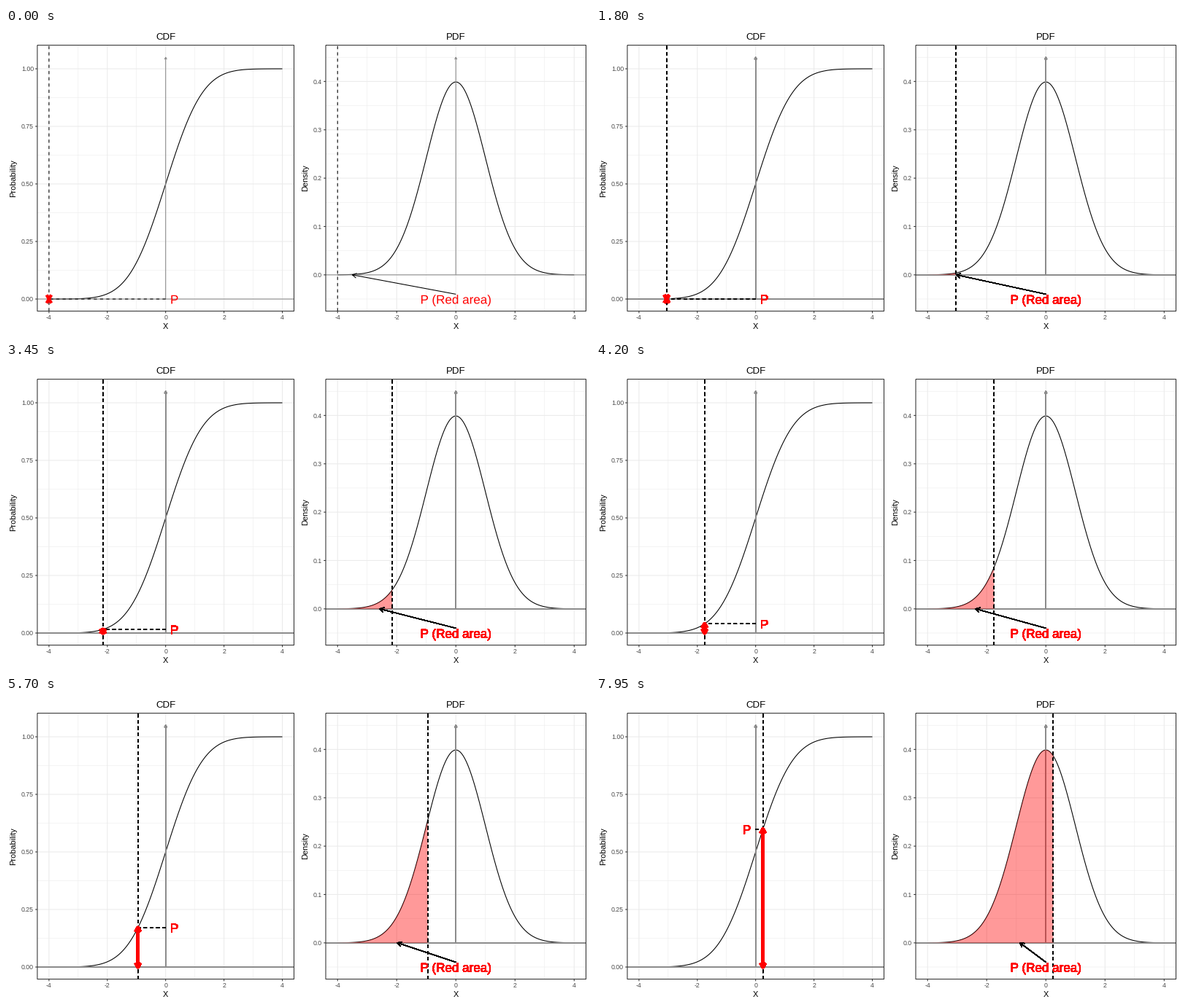
These frames come from a looping animation (800 px wide and 420 px high, 8 s). A matplotlib script:

```python
import math

import matplotlib.pyplot as plt
import numpy as np
from matplotlib.animation import FuncAnimation
from matplotlib.patheffects import Normal

plt.rcParams["font.family"] = "Liberation Sans"
plt.rcParams["path.simplify"] = False

W, H, DPI = 800, 420, 100
PT = 72 / DPI            # points per pixel
THIN = 1.07
CM = 28.35               # pixels per centimetre
TOP, BOTTOM = 23.6, 388.6
GREY = "#8c8c8c"
STEP_MS, TICK_MS, LOOP_MS = 150, 50, 8000
MAX_COPIES = 40          # edges are saturated beyond this

fig = plt.figure(figsize=(W / DPI, H / DPI), dpi=DPI, facecolor="white")
ax = fig.add_axes([0, 0, 1, 1])
ax.set(xlim=(0, W), ylim=(H, 0))
ax.axis("off")


def pdf(x):
    return np.exp(-np.square(x) / 2) / math.sqrt(2 * math.pi)


def cdf(x):
    return 0.5 * (1 + math.erf(x / math.sqrt(2)))


def stroke(xs, ys, color, width=THIN, z=1, **kw):
    line, = ax.plot(xs, ys, color=color, lw=width * PT, zorder=z,
                    solid_capstyle="butt", dash_capstyle="butt",
                    solid_joinstyle="round", **kw)
    line.set_snap(False)
    return line


def label(x, y, text, size, color="black", ha="center", z=7, **kw):
    return ax.text(x, y, text, fontsize=size * PT, color=color, ha=ha,
                   va="baseline", zorder=z, **kw)


def arrow_points(start, end, length, both=False):
    """Polyline of a shaft with open 30 degree heads."""
    (x0, y0), (x1, y1) = start, end
    heading = math.atan2(y1 - y0, x1 - x0)
    xs, ys = [x0, x1], [y0, y1]
    heads = [(x1, y1, heading)]
    if both:
        heads.append((x0, y0, heading + math.pi))
    side = length / math.cos(math.pi / 6)
    for x, y, a in heads:
        left, right = a + math.pi * 5 / 6, a - math.pi * 5 / 6
        xs += [math.nan, x + side * math.cos(left), x, x + side * math.cos(right)]
        ys += [math.nan, y + side * math.sin(left), y, y + side * math.sin(right)]
    return xs, ys


class Panel:
    def __init__(self, left, right, low, high, title, ylabel, title_x):
        self.left, self.right, self.low = left, right, low
        self.ux = (right - left) / 8.8
        self.uy = (BOTTOM - TOP) / (high - low)
        mid = (left + right) / 2
        label(mid, 16.3, title, 13.2)
        label(mid, 412.6, "X", 11)
        label(title_x, (TOP + BOTTOM) / 2, ylabel, 11, rotation=90,
              rotation_mode="anchor")
        stroke([left, right, right, left, left],
               [TOP, TOP, BOTTOM, BOTTOM, TOP], "#333333", z=8)

    def x(self, v):
        return (self.left + self.right) / 2 + self.ux * v

    def y(self, v):
        return BOTTOM - self.uy * (v - self.low)

    def grid(self, major, minor, fmt):
        for v in (-3, -1, 1, 3):
            stroke([self.x(v)] * 2, [TOP, BOTTOM], "#ebebeb", THIN / 2)
        for v in minor:
            stroke([self.left, self.right], [self.y(v)] * 2, "#ebebeb", THIN / 2)
        for v in (-4, -2, 0, 2, 4):
            x = self.x(v)
            stroke([x, x], [TOP, BOTTOM], "#ebebeb", z=1.5)
            stroke([x, x], [BOTTOM, BOTTOM + 2.75], "#333333")
            label(x, 400.5, str(v), 8.8, "#4d4d4d")
        for v in major:
            y = self.y(v)
            stroke([self.left, self.right], [y, y], "#ebebeb", z=1.5)
            stroke([self.left - 2.75, self.left], [y, y], "#333333")
            label(self.left - 4.95, y + 3.2, fmt % v, 8.8, "#4d4d4d", "right")

    def axes(self, top):
        tip = arrow_points((self.x(0), self.y(0)), (self.x(0), self.y(top)), 0.1 * CM)
        return [stroke([self.left, self.right], [self.y(0)] * 2, GREY, z=3),
                stroke(*tip, GREY, z=3)]


def dashed():
    return stroke([0, 0], [BOTTOM, TOP], "black", z=5, ls=(0, (4, 4)))


xs = np.linspace(-4, 4, 161)
cum = Panel(42.9, 394.5, -0.0525, 1.1025, "CDF", "Probability", 13.3)
den = Panel(438.0, 794.5, -0.075, 0.475, "PDF", "Density", 413.3)
cum.grid(np.arange(5) / 4, np.arange(1, 8, 2) / 8, "%.2f")
den.grid(np.arange(5) / 10, np.arange(-1, 10, 2) / 20, "%.1f")

stroke(cum.x(xs), [cum.y(cdf(v)) for v in xs], "black", z=2)
stroke(den.x(xs), den.y(pdf(xs)), "black", z=2)
area, = ax.fill([0, 0, 0], [0, 0, 0], color="red", alpha=0.4, lw=0, zorder=4)

cum_rule, den_rule, level = dashed(), dashed(), dashed()
height = stroke([], [], "red", 4 * THIN, z=6)
pointer = stroke([], [], "black", z=6)
p_text = label(0, 0, "P", 17.07, "red")
area_text = label(den.x(0), den.y(-0.05) + 6.5, "P (Red area)", 17.07, "red")
stacked = cum.axes(1.05) + den.axes(0.45) + [
    cum_rule, den_rule, level, height, pointer, p_text, area_text]


def update(i):
    k = i * TICK_MS // STEP_MS
    state = max(0, math.ceil((k - 0.5) * 160 / 99))
    s = -4 + 0.05 * state
    p = cdf(s)
    positive = state > 80

    cum_rule.set_xdata([cum.x(s)] * 2)
    den_rule.set_xdata([den.x(s)] * 2)
    level.set_data([cum.x(0), cum.x(s)], [cum.y(p)] * 2)
    height.set_data(*arrow_points((cum.x(s), cum.y(0)), (cum.x(s), cum.y(p)),
                                  0.2 * CM, both=True))
    p_text.set_position((cum.x(-0.3 if positive else 0.3), cum.y(p) + 6.5))

    tip = (s - 2) / 2 if positive else (s - 3) / 2
    pointer.set_data(*arrow_points((den.x(0), den.y(-0.04)),
                                   (den.x(tip), den.y(0)), 0.2 * CM))
    part = xs[:state + 1]
    area.set_xy(np.column_stack([
        np.r_[den.x(-4), den.x(part), den.x(s)],
        np.r_[den.y(0), den.y(pdf(part)), den.y(0)]]))

    # Every passed state repaints the marks, which hardens their soft edges.
    copies = [Normal()] * min(state + 1, MAX_COPIES)
    for artist in stacked:
        artist.set_path_effects(copies)
    return stacked + [area]


anim = FuncAnimation(fig, update, frames=LOOP_MS // TICK_MS, interval=TICK_MS,
                     repeat=True, repeat_delay=0, blit=False)
plt.show()
```
